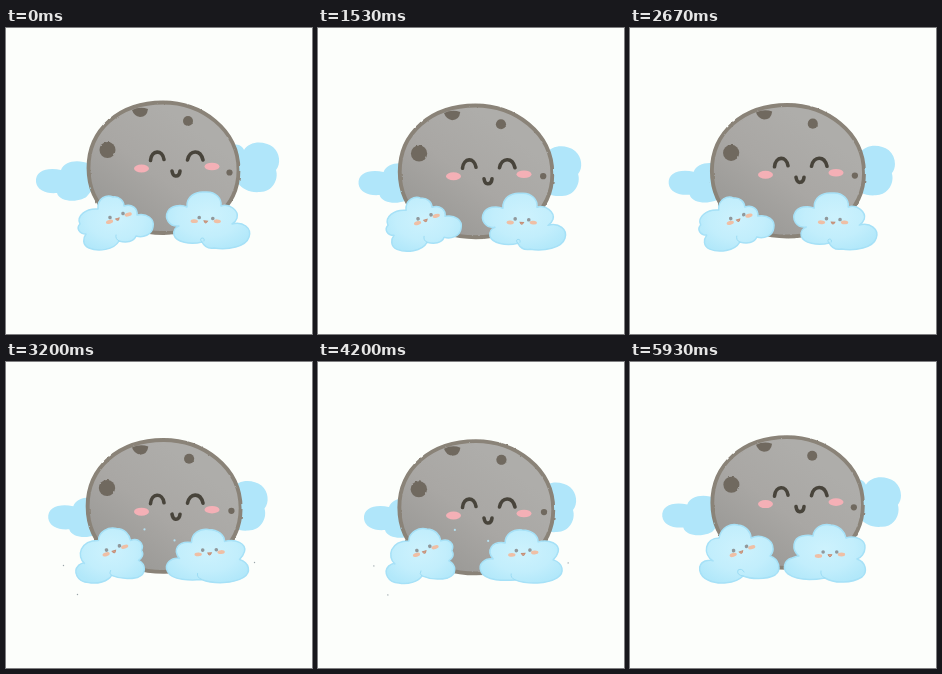
An HTML page that plays this animation: 306 by 306 pixels, repeating every 5.99 s.

```html
<!DOCTYPE html>
<html lang="en">
<head>
<meta charset="utf-8">
<title>Happy moon and clouds</title>
<style>
  html, body { margin: 0; width: 100%; height: 100%; overflow: hidden; background: #fcfefb; }
  svg { display: block; width: 100vw; height: 100vh; }
  .back { fill: #b0e6fa; }
  .crater { fill: #70695f; }
  .smile { fill: none; stroke: #48443b; stroke-width: 3.6; stroke-linecap: round; stroke-linejoin: round; }
  .cheek { fill: #f4b0b6; }
  .puff { fill: url(#sky); stroke: #a6e1f7; stroke-width: 1.5; stroke-linejoin: round; }
  .curl { fill: none; stroke: #9cdcf4; stroke-width: 1; stroke-linecap: round; }
  .eye { fill: #91989b; }
  .blush { fill: #efbfa5; }
  .mouth { fill: #d9a48c; stroke: #c48f78; stroke-width: 1; stroke-linecap: round; }
  .drop { fill: #b4dff0; }
  .far { fill: #9aa5aa; }
</style>
</head>
<body>
<svg viewBox="0 0 306 306">
  <defs>
    <linearGradient id="stone" x1=".15" y1=".85" x2=".7" y2=".2">
      <stop offset="0" stop-color="#9a9996"/>
      <stop offset=".5" stop-color="#a9a7a4"/>
      <stop offset="1" stop-color="#aeadaa"/>
    </linearGradient>
    <radialGradient id="sky" cx=".5" cy=".42" r=".62">
      <stop offset="0" stop-color="#cdf2fd"/>
      <stop offset=".6" stop-color="#c2eefc"/>
      <stop offset="1" stop-color="#b2e8fa"/>
    </radialGradient>
    <filter id="rough" x="-5%" y="-5%" width="110%" height="110%">
      <feTurbulence type="fractalNoise" baseFrequency=".16" numOctaves="2" seed="4"/>
      <feDisplacementMap in="SourceGraphic" scale="2" xChannelSelector="R" yChannelSelector="G"/>
    </filter>
  </defs>

  <path id="backL" class="back" d="M30 154C29 143 41 139 55 142C58 133 72 131 84 136L92 155L82 167C78 174 54 176 51 165C40 166 31 162 30 154Z"/>
  <path id="backR" class="back" d="M225 118C232 114 237 119 238 122C243 113 258 112 267 119C274 125 275 136 270 142C273 152 266 164 254 164C244 165 236 161 232 155L220 150Z"/>

  <g id="moon">
    <g filter="url(#rough)">
      <path d="M157 74.500C195 74.500 232.500 101 232.500 142C232.500 181 199 205 157 205C115 205 82.500 180 82.500 140C82.500 102 113 74.500 157 74.500Z" fill="url(#stone)" stroke="#8a8378" stroke-width="3.8"/>
      <path class="crater" d="M126 82Q134 78 142 81Q141 89 134 89Q128 88 126 82Z"/>
      <circle class="crater" cx="101.500" cy="122" r="8"/>
      <circle class="crater" cx="182" cy="93" r="5"/>
      <circle class="crater" cx="223.500" cy="144.500" r="3.100"/>
    </g>
  </g>

  <g id="face">
    <ellipse class="cheek" cx="135.500" cy="140.500" rx="7.500" ry="4"/>
    <ellipse class="cheek" cx="206" cy="138.500" rx="7.500" ry="3.800"/>
    <path class="smile" d="M144.500 132.500C145.500 121.500 156.500 121.500 158 131.500M181.500 132C183.500 121.500 194.500 121 197 132"/>
    <path class="smile" d="M166 143Q167 148.500 170 148Q173.500 148 174 143" stroke-width="3"/>
  </g>
  <g id="front"></g>
</svg>

<script>
const LOOP = 5990, STEP = 200 / 3, CYCLE = 18;
const $ = id => document.getElementById(id);

// Drawings of the small clouds: outline, curl, face centre and tilt,
// rest value of the sway, sway width and droplets.
const LEFT = [
  { d: "M92 181C91 170 101 166 107 169C113 168 118 173 118 178C126 175 132 181 131 187C141 185 149 191 147 199C146 207 137 210 130 208C128 214 120 215 113 213C108 222 92 224 83 220C76 217 77 210 80 206C73 206 70 200 74 196C70 188 80 180 92 181Z",
    curl: "M113 213Q109 211 110 207", face: [110.5, 187.5, -17], rest: 0, sway: 6 },
  { d: "M94 178C94 169 104 164 112 166C120 166 125 172 126 178C134 175 140 181 137 188C140 192 137 196 134 198C142 202 142 212 133 215C124 217 114 216 107 213C104 219 92 222 84 220C73 220 68 209 74 203C78 200 79 200 80 201C72 194 75 178 94 178Z",
    curl: "M107 213Q104 211 106 208", face: [108.5, 185.5, -18], rest: .55, sway: 7,
    drops: [[140, 167, "drop"], [59, 203, "far"], [73, 232, "far"]] },
  { d: "M89 176C91 165 101 161 108 163C116 164 121 170 121 176C130 172 143 176 143 187C143 190 142 192 140 194C149 197 152 208 145 213C136 218 120 217 113 214C105 222 88 223 78 218C69 214 66 203 75 199C79 198 82 198 83 199C72 192 75 176 89 176Z",
    curl: "M113 214Q106 213 108 208Q112 206 114 210", face: [110, 186.5, -18], rest: .15, sway: 7 }
];
const RIGHT = [
  { d: "M181 179C180 169 189 163 199 164C210 163 216 171 215 178C224 175 233 183 231 190C230 193 228 195 226 196C237 193 246 200 243 209C240 219 222 222 208 220C202 221 198 218 196 214C184 217 170 214 168 207C167 202 170 199 173 198C163 199 158 190 162 183C165 178 174 176 181 179Z",
    curl: "M196 214Q193 211 196 210Q199 210 198 213", face: [200, 190, 4], rest: 0, sway: 6 },
  { d: "M184 180C184 171 192 166 201 167C211 167 217 173 217 179C228 176 239 181 237 189C236 193 234 195 232 197C242 200 244 210 236 215C226 221 207 222 194 217C184 218 164 218 160 209C156 201 164 195 172 196C165 188 170 178 184 180Z",
    curl: "M194 217Q189 215 190 211", face: [202, 187.5, -2], rest: .55, sway: 7,
    drops: [[167, 178, "drop"], [247, 200, "far"]] },
  { d: "M183 174C184 166 192 161 201 163C210 164 215 170 216 176C226 173 236 178 235 186C235 191 231 196 227 197C236 200 238 210 232 215C222 221 205 222 195 216C184 218 168 219 158 212C152 207 154 198 162 196C165 195 167 194 169 194C161 188 163 176 172 174C177 173 180 173 183 174Z",
    curl: "M195 216Q190 214 191 209", face: [200, 190, 0], rest: .15, sway: 7 }
];

function makeCloud(c, dir) {
  const g = document.createElementNS("http://www.w3.org/2000/svg", "g");
  const [x, y, tilt] = c.face;
  const drops = (c.drops || []).map(([dx, dy, kind]) =>
    `<circle class="${kind}" cx="${dx}" cy="${dy}" r="${kind === "far" ? .7 : 1.1}"/>`).join("");
  g.innerHTML = `<path class="puff" d="${c.d}"/><path class="curl" d="${c.curl}"/>
    <g transform="translate(${x} ${y}) rotate(${tilt})">
      <ellipse class="blush" cx="${dir < 0 ? -8.5 : -11.5}" cy="4" rx="3.700" ry="1.900"/>
      <ellipse class="blush" cx="11.500" cy="2.500" rx="3.700" ry="1.900"/>
      <circle class="eye" cx="-6.800" r="1.800"/><circle class="eye" cx="6.800" r="1.800"/>
      <path class="mouth" d="M-1.800 3Q0 7 1.800 3Z"/>
    </g>${drops}`;
  $("front").append(g);
  return { ...c, g, dir };
}
const clouds = [LEFT.map(c => makeCloud(c, -1)), RIGHT.map(c => makeCloud(c, 1))];

const move = (id, x, y, extra = "") =>
  $(id).setAttribute("transform", `translate(${x} ${y}) ${extra}`);

function draw(time) {
  // a step may start up to 10 ms early
  let k = Math.floor((time % LOOP + 10) / STEP) % CYCLE;
  if (k === 10) k = 9; // short rest at the lowest point
  const p = k / CYCLE;
  const tri = 1 - Math.abs(1 - 2 * p);
  const arc = Math.sin(Math.PI * p);
  const u = (arc + tri) / 2;

  move("backL", 16 * u, 3 * u);
  move("backR", -15 * u, 6 * u);
  move("moon", 157.5 + .8 * u, 140 + 5.5 * u, `scale(${1 + .026 * u} ${1 + .014 * u}) translate(-157.500 -140)`);
  move("face", 0, 13 * (.2 * arc + .8 * tri));

  const shown = k < 6 ? 0 : k < 15 ? 1 : 2;
  for (const set of clouds) set.forEach((c, i) => {
    c.g.style.display = i === shown ? "" : "none";
    const off = u - c.rest;
    c.g.setAttribute("transform", `translate(${c.dir * c.sway * off} ${2 * off})`);
  });
}

const start = performance.now();
function tick() {
  draw(performance.now() - start);
  requestAnimationFrame(tick);
}
tick();
</script>
</body>
</html>
```
